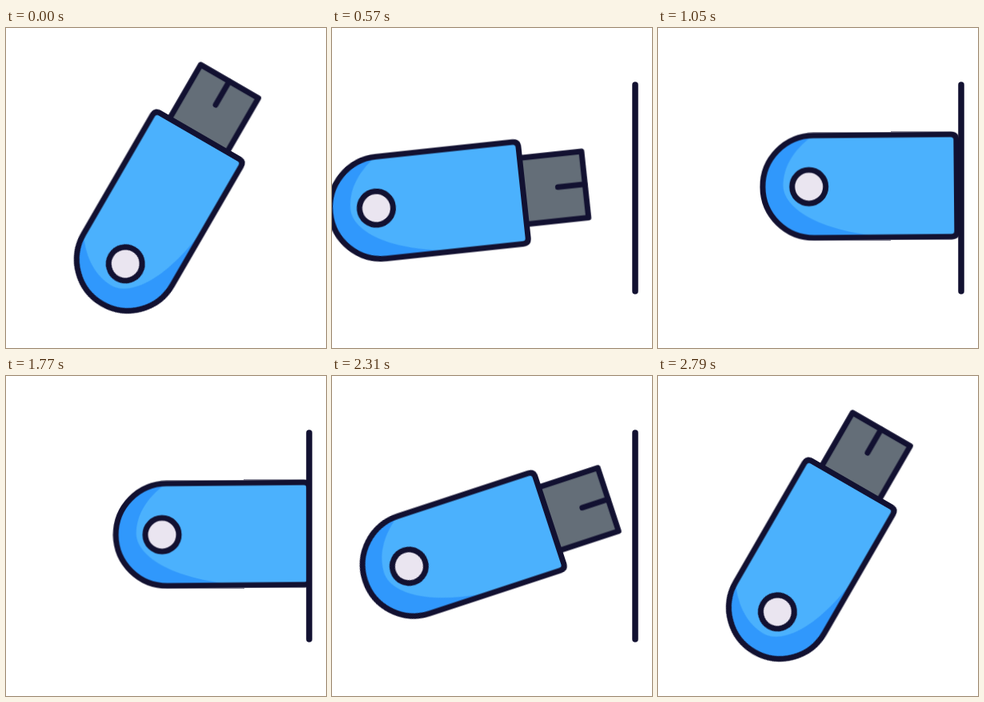
These frames come from a looping animation (400 by 400 pixels, 3090 ms). An HTML page:

```html
<!DOCTYPE html>
<html lang="en">
<head>
<meta charset="utf-8">
<title>USB stick</title>
<style>
  html, body { margin: 0; width: 100%; height: 100%; overflow: hidden; background: #fff; }
  svg { display: block; width: 100%; height: 100%; }

  .ink { stroke: #121131; stroke-width: 7; stroke-linecap: round; stroke-linejoin: round; }
  .shift, .lift, .turn, .wall { animation: 3.09s linear infinite; }
  .shift { animation-name: shift; }
  .lift { animation-name: lift; }
  .turn { animation-name: turn; }
  .wall { animation-name: wall; fill: none; stroke-width: 7.5; stroke-dasharray: 129 300; }

  /* Draw back, plug in, pull out past home, settle */
  @keyframes shift {
    0% { transform: translateX(201px); animation-timing-function: cubic-bezier(.33, 0, .67, .545); }
    9.709% { transform: translateX(182.3px); animation-timing-function: cubic-bezier(.33, .32, .67, .72); }
    18.447% { transform: translateX(158.1px); animation-timing-function: cubic-bezier(.33, .58, .67, 1); }
    20.388% { transform: translateX(155.5px); animation-timing-function: cubic-bezier(.33, 0, .67, .847); }
    33.981% { transform: translateX(291.7px); animation-timing-function: cubic-bezier(.15, .8, .3, 1); }
    41.748% { transform: translateX(298.7px); }
    56.311% { transform: translateX(298.7px); animation-timing-function: cubic-bezier(.4, 0, .67, .64); }
    74.757% { transform: translateX(194.6px); animation-timing-function: cubic-bezier(.33, .9, .67, 1); }
    77.67% { transform: translateX(188px); animation-timing-function: cubic-bezier(.33, 0, .67, 1); }
    90.291%, 100% { transform: translateX(201px); }
  }
  @keyframes lift {
    0% { transform: translateY(205.5px); animation-timing-function: cubic-bezier(.33, 0, .67, 1); }
    9.709% { transform: translateY(230.8px); animation-timing-function: cubic-bezier(.33, 0, .67, .33); }
    18.447% { transform: translateY(214.3px); animation-timing-function: cubic-bezier(.2, .7, .4, 1); }
    33.981% { transform: translateY(197.5px); }
    69.903% { transform: translateY(197.5px); animation-timing-function: cubic-bezier(.33, 0, .67, .33); }
    74.757% { transform: translateY(205.6px); animation-timing-function: cubic-bezier(.2, .8, .5, 1); }
    77.67% { transform: translateY(207px); animation-timing-function: cubic-bezier(.33, 0, .67, 1); }
    83.495% { transform: translateY(201.7px); animation-timing-function: cubic-bezier(.33, 0, .67, 1); }
    90.291%, 100% { transform: translateY(205.5px); }
  }
  @keyframes turn {
    0% { transform: rotate(-60deg); animation-timing-function: cubic-bezier(.33, .26, .67, .615); }
    9.709% { transform: rotate(-32.7deg); animation-timing-function: cubic-bezier(.33, .36, .67, .66); }
    18.447% { transform: rotate(-6.2deg); animation-timing-function: cubic-bezier(.33, .8, .67, 1); }
    23.301% { transform: rotate(-.5deg); }
    69.903% { transform: rotate(-.5deg); animation-timing-function: cubic-bezier(.33, 0, .67, .42); }
    74.757% { transform: rotate(-18deg); animation-timing-function: cubic-bezier(.33, .38, .67, 1); }
    83.495% { transform: rotate(-65deg); animation-timing-function: cubic-bezier(.33, 0, .67, 1); }
    90.291%, 100% { transform: rotate(-60deg); }
  }
  /* The wall grows from its middle and shrinks back */
  @keyframes wall {
    0% { stroke-dashoffset: 135; animation-timing-function: cubic-bezier(.37, 0, .63, 1); }
    12.621% { stroke-dashoffset: 0; }
    74.757% { stroke-dashoffset: 0; animation-timing-function: cubic-bezier(.37, 0, .63, 1); }
    87.379%, 100% { stroke-dashoffset: 135; }
  }
</style>
</head>
<body>
<svg viewBox="0 0 400 400">
  <defs>
    <clipPath id="room"><rect width="379" height="400"/></clipPath>
    <path id="body" d="M0-64H171.500q7 0 7 7V57q0 7-7 7H0A64 64 0 0 1 0-64Z"/>
  </defs>
  <g clip-path="url(#room)">
    <g class="shift"><g class="lift"><g class="turn">
      <g transform="translate(-97 0)">
        <g class="ink" fill="#646e78">
          <path d="M178-43.300H256.300V40H178Z"/>
          <path d="M256-1.900H222.300"/>
        </g>
        <use href="#body" fill="#3098fc"/>
        <path fill="#4bb1fd" d="M0-64C-28-45-38-22-38.500-2C-38 32 20 60 100 64H171.500q7 0 7-7V-57q0-7-7-7Z"/>
        <use href="#body" class="ink" fill="none"/>
        <circle class="ink" cx="-6.200" r="21" fill="#eae5f0"/>
      </g>
    </g></g></g>
  </g>
  <path class="ink wall" d="M379 200V71M379 200V329"/>
</svg>
</body>
</html>
```
